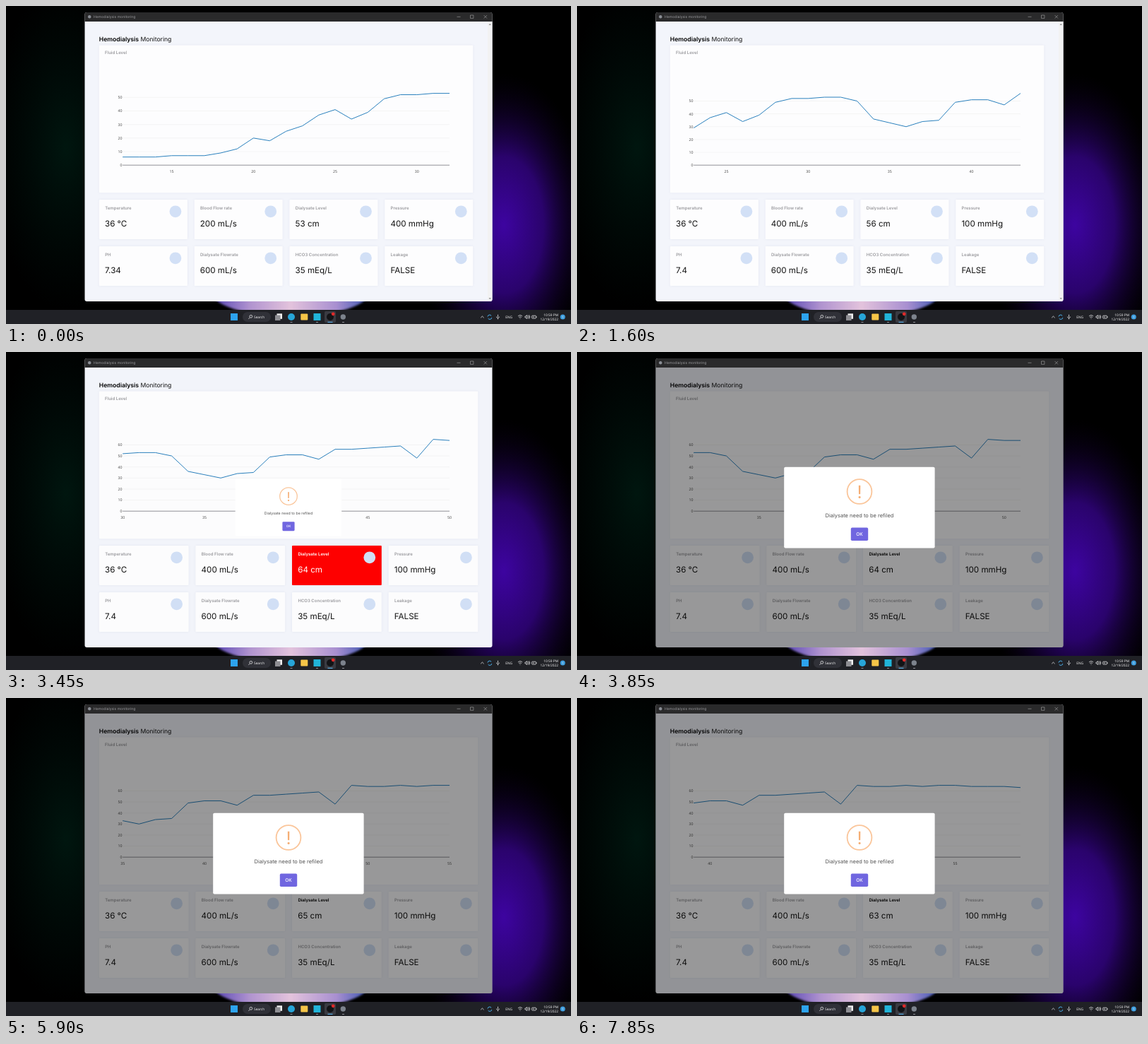
An HTML page that plays this animation: 800 by 450 pixels, repeating every 8000 ms.

```html
<!DOCTYPE html>
<html lang="en">
<head>
<meta charset="utf-8">
<title>Hemodialysis monitoring</title>
<style>
  html, body { margin: 0; width: 100%; height: 100%; overflow: hidden; background: #000; }
  svg { display: block; width: 100vw; height: 100vh; }
  text { font-family: Inter, sans-serif; text-rendering: geometricPrecision; }
  .label { font-size: 6.05px; font-weight: 600; fill: #9b9b9f; }
  .value { font-size: 11.6px; fill: #111; }
  .card { fill: #fdfdfe; filter: drop-shadow(0 0 1.5px rgba(90, 100, 150, .1)); }
  .dot { fill: #d2e0f6; }
  .tick { font: 5.25px "Open Sans", sans-serif; fill: #444; }
  .grid { stroke: #eee; stroke-width: .6; }
  .zero { stroke: #85858c; stroke-width: .9; }
  .line { fill: none; stroke: #2a80bd; stroke-width: 1; stroke-linejoin: round; }
  .tray { font: 4.8px "Open Sans", sans-serif; fill: #fff; }
  .icon { fill: none; stroke: #e8e8ea; stroke-width: .8; }
  .ctl { fill: none; stroke: #a5a5a5; stroke-width: .6; }
  .alarm .card { fill: #f00; }
  .alarm text { fill: #fff; }
  .warned .label { fill: #000; }
</style>
</head>
<body>
<svg viewBox="0 0 800 450" preserveAspectRatio="none">
  <defs>
    <radialGradient id="violet">
      <stop offset="0" stop-color="#3d04a0"/>
      <stop offset=".45" stop-color="#2a036c"/>
      <stop offset="1" stop-color="#0a0018" stop-opacity="0"/>
    </radialGradient>
    <radialGradient id="green">
      <stop offset="0" stop-color="#00160f"/>
      <stop offset="1" stop-color="#00100c" stop-opacity="0"/>
    </radialGradient>
    <linearGradient id="glow">
      <stop offset="0" stop-color="#4b3bb0"/>
      <stop offset=".25" stop-color="#b093cf"/>
      <stop offset=".5" stop-color="#e3c3dc"/>
      <stop offset=".78" stop-color="#a88fd0"/>
      <stop offset="1" stop-color="#2f4fae"/>
    </linearGradient>
    <filter id="soft"><feGaussianBlur stdDeviation="1.5"/></filter>
    <clipPath id="win"><rect x="111.5" y="9" width="577" height="409" rx="3"/></clipPath>
  </defs>

  <rect width="800" height="450" fill="#000"/>
  <ellipse cx="85" cy="200" rx="110" ry="230" fill="url(#green)"/>
  <ellipse cx="705" cy="310" rx="125" ry="215" fill="url(#violet)"/>
  <ellipse cx="403" cy="400" rx="116" ry="40" fill="url(#glow)" filter="url(#soft)"/>

  <g clip-path="url(#win)">
    <rect x="111" y="9" width="578" height="409" fill="#f3f5fb"/>
    <rect x="111" y="9" width="578" height="13" fill="#2a2a2b"/>
    <circle cx="118.2" cy="15.3" r="2.2" fill="#8b8f96"/>
    <text x="124" y="17.2" font-size="5.1" fill="#97979a">Hemodialysis monitoring</text>
    <path class="ctl" d="M638.5 15.3h5M657.5 13h4.4v4.4h-4.4zM676.6 13.1l4.4 4.4m0-4.4l-4.4 4.4"/>
    <text x="131.8" y="50.2" font-size="8.65" fill="#111"><tspan font-weight="600" fill="#000">Hemodialysis</tspan> Monitoring</text>
    <rect id="panel" class="card" x="131.8" y="55.5" height="208.7" rx="1"/>
    <text class="label" x="140" y="67.6">Fluid Level</text>
    <g id="chart"></g>
    <g id="cards"></g>
    <g id="scroll">
      <rect x="682" y="22" width="7" height="396" fill="#f2f2f3"/>
      <path d="M683.5 27l1.7-2 1.7 2zM683.5 413l1.7 2 1.7-2z" fill="#8d8d8d"/>
    </g>
    <rect id="shade" x="111" y="22" width="578" height="396" fill="#000"/>
    <g id="popup">
      <rect x="293.2" y="162.7" width="213.4" height="114.7" rx="2" fill="#fff"/>
      <circle cx="400" cy="197.5" r="17.4" fill="none" stroke="#fac59a" stroke-width="1.8"/>
      <g text-anchor="middle">
        <text x="400" y="206.8" font-size="25" fill="#f5ae74">!</text>
        <text x="400" y="234.2" font-size="7.5" fill="#545454">Dialysate need to be refiled</text>
        <rect x="387.8" y="248.6" width="24.4" height="18.4" rx="1.8" fill="#7066e0"/>
        <text x="400" y="260.2" font-size="6.5" font-weight="500" fill="#fff">OK</text>
      </g>
    </g>
  </g>

  <rect y="430" width="800" height="20" fill="#202126"/>
  <rect x="318" y="435" width="10" height="10" fill="#2da3ee"/>
  <rect x="335" y="433" width="40" height="14" rx="7" fill="#303138"/>
  <circle class="icon" cx="346.8" cy="439.3" r="1.9"/>
  <path class="icon" d="M345.4 440.8l-2 2"/>
  <text class="tray" x="351" y="441.9" font-size="5">Search</text>
  <rect x="383.5" y="435.3" width="7.5" height="7.5" fill="#eee"/>
  <rect x="381" y="437.5" width="7.5" height="7.5" fill="#8e8e93"/>
  <circle cx="404" cy="440" r="5" fill="#27a5d8"/>
  <rect x="417.3" y="435.5" width="10" height="9" rx="1" fill="#f6c548"/>
  <rect x="435.5" y="435" width="10" height="10" fill="#21b4d9"/>
  <rect x="451" y="432" width="16" height="16" rx="2" fill="#3a3b42"/>
  <circle cx="459" cy="440" r="5" fill="#131316"/>
  <circle cx="463.2" cy="435.8" r="2.4" fill="#e02a2a"/>
  <circle cx="477.3" cy="440" r="3.7" fill="#7d838d"/>
  <path d="M402.5 447.5h3M439 447.5h3M476 447.5h3" stroke="#9a9aa0" stroke-width=".9"/>
  <path d="M455.5 447.4h7" stroke="#5bb8f5" stroke-width="1.1"/>

  <path class="icon" d="M672.2 441.2l2.2-2.2 2.2 2.2"/>
  <path d="M682 439.5a2.8 2.8 0 0 1 5.2-1m.6 2.5a2.8 2.8 0 0 1-5.2 1" fill="none" stroke="#4bb2f0"/>
  <path class="icon" d="M696.5 436.7v3.4M694.6 439.6a1.9 1.9 0 0 0 3.8 0M696.5 441.6v1.8"/>
  <text class="tray" x="707.3" y="441.8">ENG</text>
  <path class="icon" d="M725 439a4 4 0 0 1 6 0M726.3 440.6a2.4 2.4 0 0 1 3.4 0M727.6 442.3h.8"/>
  <path class="icon" d="M735 439h1l1.8-1.6v5.2L736 441h-1zM739.3 438.3a2.2 2.2 0 0 1 0 3.4M740.5 437.2a4 4 0 0 1 0 5.6"/>
  <rect class="icon" x="744.7" y="438.2" width="5.6" height="3.8" rx=".6"/>
  <path class="icon" d="M746 440.1h2M751.2 439.4v1.4"/>
  <text class="tray" x="782" y="438.6" text-anchor="end">10:59 PM</text>
  <text class="tray" x="782" y="445" text-anchor="end">12/19/2022</text>
  <circle cx="788.3" cy="440" r="3.5" fill="#3f9fe0"/>
  <text class="tray" x="788.3" y="441.6" text-anchor="middle">1</text>
</svg>

<script>
const LOOP = 8000, SPAN = 20, FIRST = 12, ALERT_AT = 3450;
const LEFT = 165.2, RIGHT = 628, BASE = 225.2, PEAK = 101.6;

// fluid level per sample, beginning at sample FIRST
const levels = [6, 6, 6, 7, 7, 7, 9, 12, 20, 18, 25, 29, 37, 41, 34, 39, 49, 52, 52, 53, 53,
  50, 36, 33, 30, 34, 35, 49, 51, 51, 47, 56, 56, 57, 58, 59, 48,
  65, 64, 64, 65, 64, 65, 65, 64, 64, 64, 63];

// arrival times of the samples after the first full window
const arrivals = Array.from({ length: 16 }, (_, i) => 50 + 147 * i)
  .concat(3000, 3450, 3850, 4400, 4800, 5300, 5750, 6200, 6650, 7200, 7650);

const byId = id => document.getElementById(id);
const chart = byId('chart'), popup = byId('popup'), shade = byId('shade');

const names = ['Temperature', 'Blood Flow rate', 'Dialysate Level', 'Pressure',
  'PH', 'Dialysate Flowrate', 'HCO3 Concentration', 'Leakage'];

byId('cards').innerHTML = names.map((name, i) => {
  const y = i < 4 ? 274 : 340;
  return `<g><rect class="card" y="${y}" height="56" rx="1"/>
    <circle class="dot" cy="${y + 16.8}" r="8.4"/>
    <text class="label" x="8.4" y="${y + 14}">${name}</text>
    <text class="value" x="8.2" y="${y + 37.8}"></text></g>`;
}).join('');
const cards = [...byId('cards').children];

function drawChart(last) {
  const start = last - SPAN;
  const shown = levels.slice(start - FIRST, last - FIRST + 1);
  const max = Math.max(...shown);
  const px = n => LEFT + (n - start) * (RIGHT - LEFT) / SPAN;
  const py = v => BASE - v * PEAK / max;
  let out = '';
  for (let v = 0; v <= max * 1.05; v += 10) {
    const y = py(v);
    out += `<path class="${v ? 'grid' : 'zero'}" d="M${LEFT} ${y}H${RIGHT}"/>
      <text class="tick" x="${LEFT - .6}" y="${y + 1.9}" text-anchor="end">${v}</text>`;
  }
  for (let n = Math.ceil(start / 5) * 5; n <= last; n += 5)
    out += `<text class="tick" x="${px(n)}" y="236.2" text-anchor="middle">${n}</text>`;
  const pts = shown.map((v, i) => `${px(start + i).toFixed(2)},${py(v).toFixed(2)}`);
  chart.innerHTML = out + `<polyline class="line" points="${pts.join(' ')}"/>`;
}

function drawCards(last, wide) {
  const late = last >= 39;
  const values = ['36 °C', (late ? 400 : 200) + ' mL/s', levels[last - FIRST] + ' cm',
    (late ? 100 : 400) + ' mmHg', late ? '7.4' : '7.34', '600 mL/s', '35 mEq/L', 'FALSE'];
  const width = wide ? 126.8 : 125.1, pitch = wide ? 136.6 : 134.8;
  byId('panel').setAttribute('width', pitch * 3 + width);
  cards.forEach((card, i) => {
    card.setAttribute('transform', `translate(${131.8 + pitch * (i % 4)})`);
    card.querySelector('rect').setAttribute('width', width);
    card.querySelector('circle').setAttribute('cx', width - 17);
    card.querySelector('.value').textContent = values[i];
  });
  // above the limit the level card blinks with every sample
  cards[2].setAttribute('class', last < 49 ? '' : last % 2 ? 'warned' : 'alarm');
}

function popScale(p) {
  const keys = [[0, .7], [.45, 1.05], [.8, .95], [1, 1]];
  if (p >= 1) return 1;
  const k = keys.findIndex(key => key[0] > p);
  const [a, from] = keys[k - 1], [b, to] = keys[k];
  return from + (to - from) * (p - a) / (b - a);
}

let state = '';
function render(t) {
  const last = FIRST + SPAN + arrivals.filter(a => a <= t).length;
  const open = t >= ALERT_AT, age = t - ALERT_AT;
  if (state !== last + ' ' + open) {
    state = last + ' ' + open;
    drawChart(last);
    drawCards(last, open);
    byId('scroll').style.display = open ? 'none' : '';
    popup.style.display = open ? '' : 'none';
  }
  shade.setAttribute('opacity', open ? .4 * Math.min(1, age / 80) : 0);
  if (open)
    popup.setAttribute('transform', `translate(400 220) scale(${popScale(age / 150)}) translate(-400 -220)`);
}

const began = performance.now();
function tick() {
  render((performance.now() - began) % LOOP);
  requestAnimationFrame(tick);
}
tick();
</script>
</body>
</html>
```
